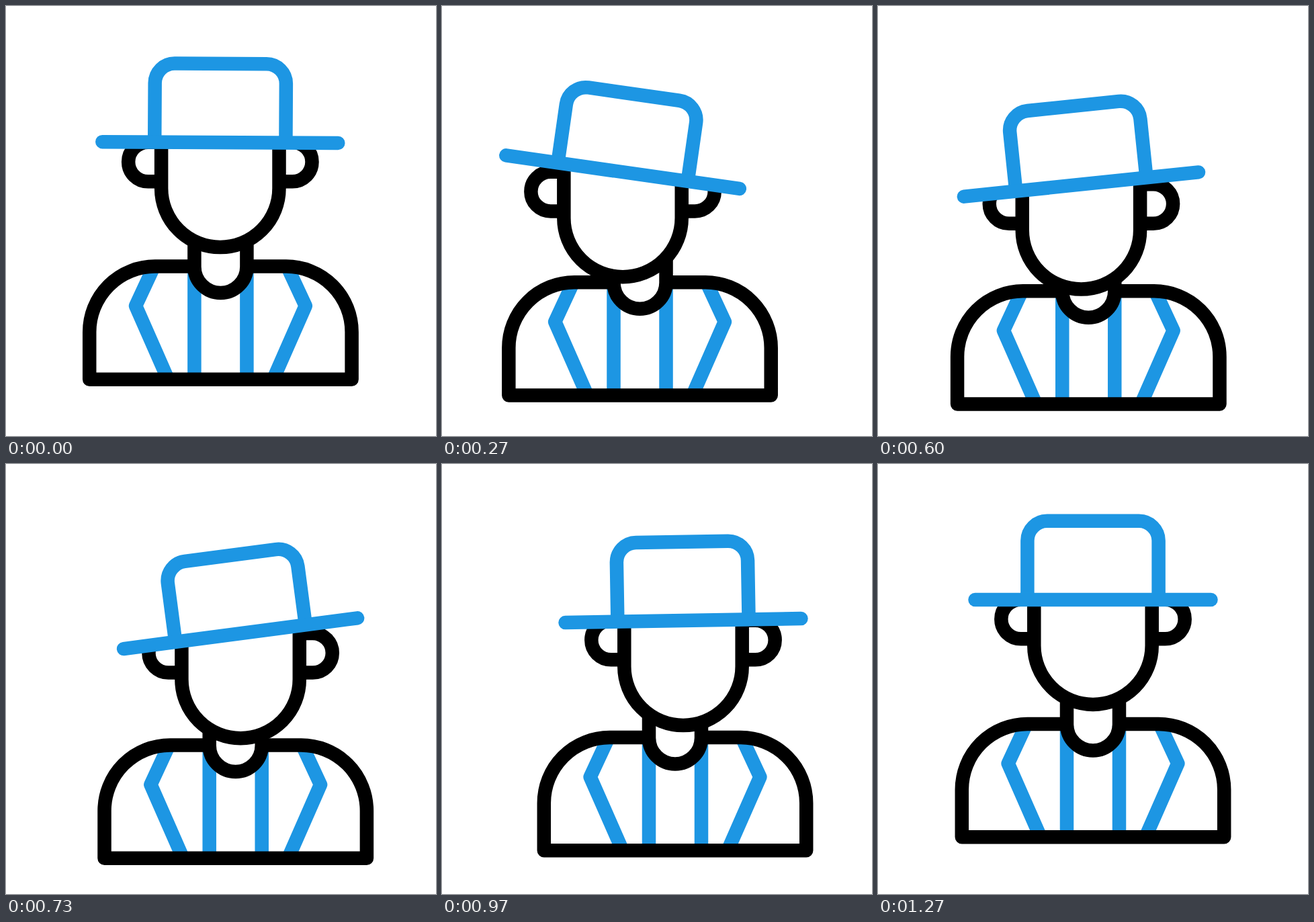
Recreate the animation shown at these times as an HTML page. Size 640 by 640 pixels, loop 1.67 s.

```html
<!DOCTYPE html>
<html lang="en">
<head>
<meta charset="utf-8">
<title>Man in a hat</title>
<style>
  html, body { margin: 0; width: 100%; height: 100%; overflow: hidden; background: #fff; }
  svg { display: block; width: 100%; height: 100%; }
  path { fill: none; stroke: #000; stroke-width: 20.5; stroke-linejoin: round; }
  .blue { stroke: #1d96e3; }
  .white { fill: #fff; }
</style>
</head>
<body>
<svg viewBox="0 0 640 640">
  <g id="body">
    <path class="blue" d="M281 390V550M359 390V550M219.500 390L193.600 445.700L239.500 550M420.500 390L446.400 445.700L400.500 550"/>
    <path d="M281 387H222.400A97.600 97.600 0 0 0 124.800 484.600V555.200H515.200V484.600A97.600 97.600 0 0 0 417.600 387H359"/>
    <path d="M281 345V387.400A39 39 0 0 0 359 387.400V345"/>
  </g>
  <g id="head">
    <path d="M232 201.700H212.600a29.300 29.300 0 0 0 0 58.600H232M408 201.700H427.400a29.300 29.300 0 0 1 0 58.600H408"/>
    <path class="white" d="M232.300 195V270.300A87.700 87.700 0 0 0 407.700 270.300V195"/>
    <g id="hat">
      <rect class="white" x="134" y="80" width="372" height="122"/>
      <path class="blue" d="M222.400 202V114.100a29.300 29.300 0 0 1 29.300 -29.300H388.300a29.300 29.300 0 0 1 29.300 29.300V202"/>
      <path class="blue" stroke-linecap="round" d="M144.500 202H495.500"/>
    </g>
  </g>
</svg>
<script>
  const FPS = 30, LOOP = 1670;
  const [body, head, hat] = ['body', 'head', 'hat'].map(id => document.getElementById(id));

  // Eased 0..1 progress between two ticks
  const ease = (n, from, to) => {
    const u = Math.min(1, Math.max(0, (n - from) / (to - from)));
    return u * u * (3 - 2 * u);
  };

  // Swing: straight out to the left, along a curved dip to the right, straight home
  function makeRoute(left, c1, c2, right) {
    const dip = document.createElementNS('http://www.w3.org/2000/svg', 'path');
    dip.setAttribute('d', `M${left}C${c1} ${c2} ${right}`);
    const length = dip.getTotalLength();
    return n => {
      if (n < 11.6) return left.map(v => v * ease(n, -1, 11));
      if (n > 26.3) return right.map(v => v * (1 - ease(n, 26, 38)));
      const p = dip.getPointAtLength(length * ease(n, 11.6, 26.3));
      return [p.x, p.y];
    };
  }

  const bodyRoute = makeRoute([-30.2, 28.8], [-40, 49], [44, 30], [32, 23.8]);
  const headRoute = makeRoute([-60.4, 53.5], [-66, 87], [66, 43], [46.2, 36.8]);
  const tilt = n => 8.35 * ease(n, -1.15, 9) - 16.25 * ease(n, 9, 20.5) + 7.9 * ease(n, 20.5, 31.4);

  function draw() {
    const n = Math.floor((performance.now() % LOOP + 4) * FPS / 1000);
    body.setAttribute('transform', `translate(${bodyRoute(n)})`);
    head.setAttribute('transform', `translate(${headRoute(n)})`);
    hat.setAttribute('transform', `rotate(${tilt(n)} 320 202)`);
    requestAnimationFrame(draw);
  }
  draw();
</script>
</body>
</html>
```
